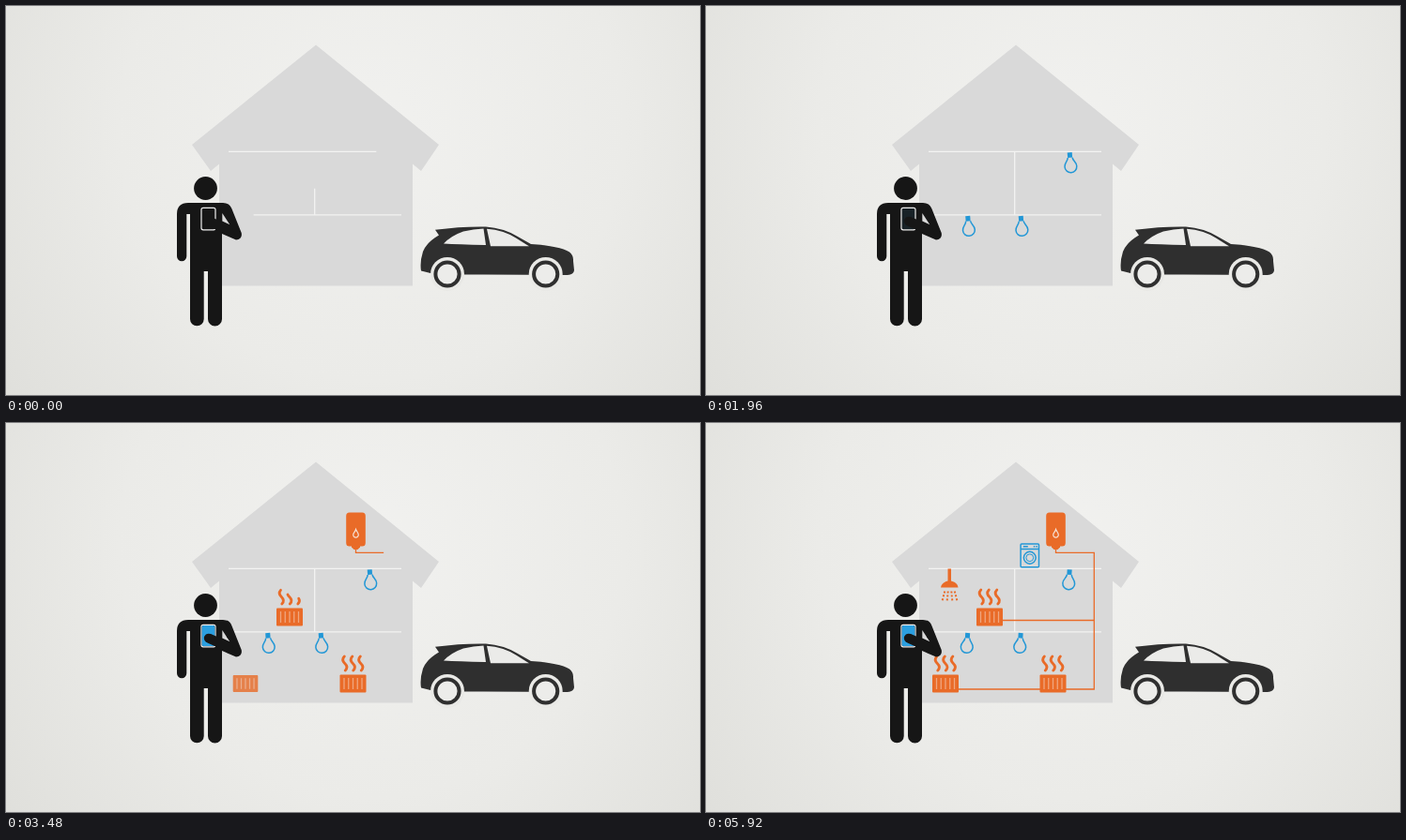
An HTML page for the animation above (5960 ms loop, 739 px wide and 415 px high).

```html
<!DOCTYPE html>
<html lang="en">
<head>
<meta charset="utf-8">
<title>Connected home</title>
<style>
  html, body { margin: 0; width: 100%; height: 100%; overflow: hidden; background: #e8e8e5; }
  svg { display: block; width: 100vw; height: 100vh; }
  .line { fill: none; stroke: #f3f3f2; stroke-width: 1.3; }
  .hot { fill: #e96b28; }
  .pipe { fill: none; stroke: #e96b28; stroke-width: 1.3; }
  .steam { fill: none; stroke: #e96b28; stroke-width: 2.8; stroke-linecap: round; }
  .cool { fill: none; stroke: #2297d6; stroke-width: 1.5; }
</style>
</head>
<body>
<svg viewBox="0 0 739 415">
  <defs>
    <radialGradient id="bg" gradientUnits="userSpaceOnUse" cx="390" cy="130" r="490">
      <stop offset="0" stop-color="#f1f1ef"/>
      <stop offset=".55" stop-color="#ebebe8"/>
      <stop offset="1" stop-color="#dfdfdb"/>
    </radialGradient>
    <g id="bulb">
      <path d="M-2.5 0H2.5V5.5H-2.5Z" fill="#2297d6"/>
      <path class="cool" d="M-2.5 5.5C-2.5 9-6.4 10.5-6.4 15A6.4 6.4 0 0 0 6.4 15C6.4 10.5 2.5 9 2.5 5.5"/>
    </g>
    <g id="radiator">
      <rect class="hot" x="-14" y="-9.5" width="28" height="19" rx="1"/>
      <path d="M-9.5-6V6M-4.75-6V6M0-6V6M4.75-6V6M9.5-6V6" stroke="#f0a67e" stroke-width="1.3"/>
    </g>
  </defs>

  <rect width="739" height="415" fill="url(#bg)"/>
  <path d="M330 41.5L461 148L442 176L433 168.5V298.5H227V168.5L218 176L198 148Z" fill="#d9d9d9"/>
  <path id="upper" class="line" d="M237 155.3H421"/>
  <path id="lower" class="line" d="M421 222.8H237"/>
  <path id="wall" class="line" d="M328.7 223V155"/>

  <path id="main" class="pipe" d="M372.5 134V138.3H413.3V284H269"/>
  <path id="branch" class="pipe" d="M413 210.5H316"/>

  <g id="heaters"></g>
  <g id="bulbs"></g>

  <g id="boiler">
    <rect class="hot" x="-10.3" y="-19.5" width="20.6" height="36" rx="3.5"/>
    <path class="hot" d="M-4.5 16H4.5V17.5L2 20H-2L-4.5 17.5Z"/>
    <path d="M0-1.5C1 1 2.8 2 2.8 4.3A2.8 2.8 0 0 1-2.8 4.3C-2.8 2-.6 1 0-1.5Z" fill="none" stroke="#f7e2d6" stroke-width="1.2"/>
  </g>

  <g id="shower">
    <path class="hot" d="M257.5 155.5H261V168.5C265 169.5 268 171.5 268.5 175.5H250C250.5 171.5 253.5 169.5 257.5 168.5Z"/>
    <path id="drops" fill="none" stroke="#e96b28" stroke-width="2" stroke-dasharray="2 2"
      d="M254.5 178.5L251.5 190M257.8 178.5L256.7 190M261.2 178.5L262.3 190M264.5 178.5L267.5 190"/>
  </g>

  <g id="washer" class="cool">
    <rect x="-9.7" y="-12.3" width="19.4" height="24.8" rx="1"/>
    <path d="M-9.7-6.7H9.7M-7-9.5H-2M4-9.5H5.5M6.5-9.5H8"/>
    <circle cy="2.5" r="6.4"/>
    <circle cy="2.5" r="3.9" stroke-width="1"/>
  </g>

  <g fill="#161616">
    <circle cx="212.5" cy="194.5" r="12.4"/>
    <path d="M194 210H231Q238 210 240.3 216L250.7 242Q252 248.5 245 249.5L230 243V334A7.3 7.3 0 0 1 215 334V283H210.7V334A7.3 7.3 0 0 1 196 334V222H192.3V267A5.1 5.1 0 0 1 182 267V222Q182 210 194 210Z"/>
    <path d="M230.3 221L238.3 233.3L230.3 229.6Z" fill="#d9d9d9"/>
    <rect x="208" y="215.3" width="15" height="23.5" rx="2" stroke="#f1f1f1" stroke-width="1.2"/>
    <rect id="screen" x="208.7" y="216" width="13.6" height="22.1" rx="1.5" fill="#2b9fe0"/>
    <path d="M211 228Q213 223.5 218 225L240 234.5L246 249L214.5 234.5Q210 232 211 228Z"/>
  </g>

  <path d="M457 238.8Q485 235 511 235.5Q530 237 544 245.5L559 254Q590 256 600 262.5Q604.5 266 604 272L605 282Q604.5 286.5 598 287L486 286.5L452 285L442 282.5Q440.500 273 444 262Q448 252 461 244.500Z" fill="#2f2f2f"/>
  <path d="M466 253.500Q474 245 487 240.500Q498 238 508.500 237.500L511 255Q482 254.500 466 253.500ZM512 237.700Q530 239 543 247.500L557 256.300H516Z" fill="#ebebe9"/>
  <g id="wheels"></g>
</svg>
<script>
const LOOP = 5960;
const $ = id => document.getElementById(id);
const ramp = (t, start, span) => Math.min(1, Math.max(0, (t - start) / span));
const out = p => 1 - (1 - p) ** 3;

const bulbs = [[278.7, 224], [335.2, 224], [387.2, 156.3]];
// x, y, time the radiator appears, time its steam starts
const heaters = [
  [369.5, 278, 2320, 2750],
  [302, 207, 2480, 3090],
  [255, 278, 3200, 3620]
];

$('bulbs').innerHTML = bulbs.map(() => '<use href="#bulb"/>').join('');
$('heaters').innerHTML = heaters.map(([x, y]) =>
  '<use href="#radiator"/>' + [-8.2, 0.3, 8.8].map(dx =>
    `<path class="steam" d="M${x + dx} ${y - 14}c3-3 1.500-5.500-.5-7.500s-3.500-4.500-.5-7.500"/>`
  ).join('')).join('');
$('wheels').innerHTML = [470, 574.7].map(x =>
  `<g transform="translate(${x} 286)"><circle r="18" fill="#e9e9e6"/>
   <circle r="12.600" fill="#ececea" stroke="#2f2f2f" stroke-width="4"/></g>`).join('');

const bulbEls = [...$('bulbs').children];
const radiators = [...document.querySelectorAll('#heaters use')];
const steams = [...document.querySelectorAll('.steam')];

function draw(el, p) {
  el.setAttribute('pathLength', 1);
  el.setAttribute('stroke-dasharray', p < 1 ? `${p} 2` : 'none');
  el.style.opacity = p > 0 ? 1 : 0;
}

function place(el, x, y, scale, opacity, angle = 0) {
  el.setAttribute('transform', `translate(${x} ${y}) rotate(${angle}) scale(${scale})`);
  el.style.opacity = opacity;
}

function render(t) {
  const across = 0.853 + 0.147 * out(ramp(t, 0, 220));
  draw($('upper'), across);
  draw($('lower'), across);
  draw($('wall'), 0.41 + 0.59 * out(ramp(t, 0, 400)));

  // A damped first swing over a slow, steady sway
  const wave = (peak, period) => Math.cos(2 * Math.PI * (t - peak) / period);
  const settle = ramp(t, 1200, 700);
  const swing = -68 * Math.exp(-(t - 640) / 350) * wave(1120, 900) - 4 * settle * wave(3480, 1700);
  bulbs.forEach(([x, y], i) => {
    const p = ramp(t, 640 + i * 50, 200);
    place(bulbEls[i], x, y, out(p), p, swing);
  });

  $('screen').style.opacity = ramp(t, 1940, 240);

  heaters.forEach(([x, y, start, steamStart], i) => {
    const p = ramp(t, start, 350);
    place(radiators[i], x, y, 0.75 + 0.25 * p, p);
    for (let j = 0; j < 3; j++)
      draw(steams[i * 3 + j], ramp(t, steamStart + j * 120, 400));
  });

  const b = ramp(t, 2440, 400);
  place($('boiler'), 372.5, 115 - 12 * (1 - b), 0.83 + 0.17 * b, b);

  draw($('main'), ramp(t, 3400, 800));
  draw($('branch'), ramp(t, 3680, 230));

  const s = ramp(t, 3800, 300);
  $('shower').style.opacity = s;
  $('shower').setAttribute('transform', `translate(0 ${155 * (1 - out(s))}) scale(1 ${out(s)})`);
  $('drops').style.opacity = ramp(t, 4100, 200);
  $('drops').setAttribute('stroke-dashoffset', -Math.floor(t / 80) * 0.5);

  const w = ramp(t, 4300, 350);
  const shake = w * Math.sin(t / 28);
  place($('washer'), 345.2 + 0.5 * shake, 141 - 0.3 * shake, 0.75 + 0.25 * out(w), w);
}

const begin = performance.now();
function tick() {
  render((performance.now() - begin) % LOOP);
  requestAnimationFrame(tick);
}
tick();
</script>
</body>
</html>
```
